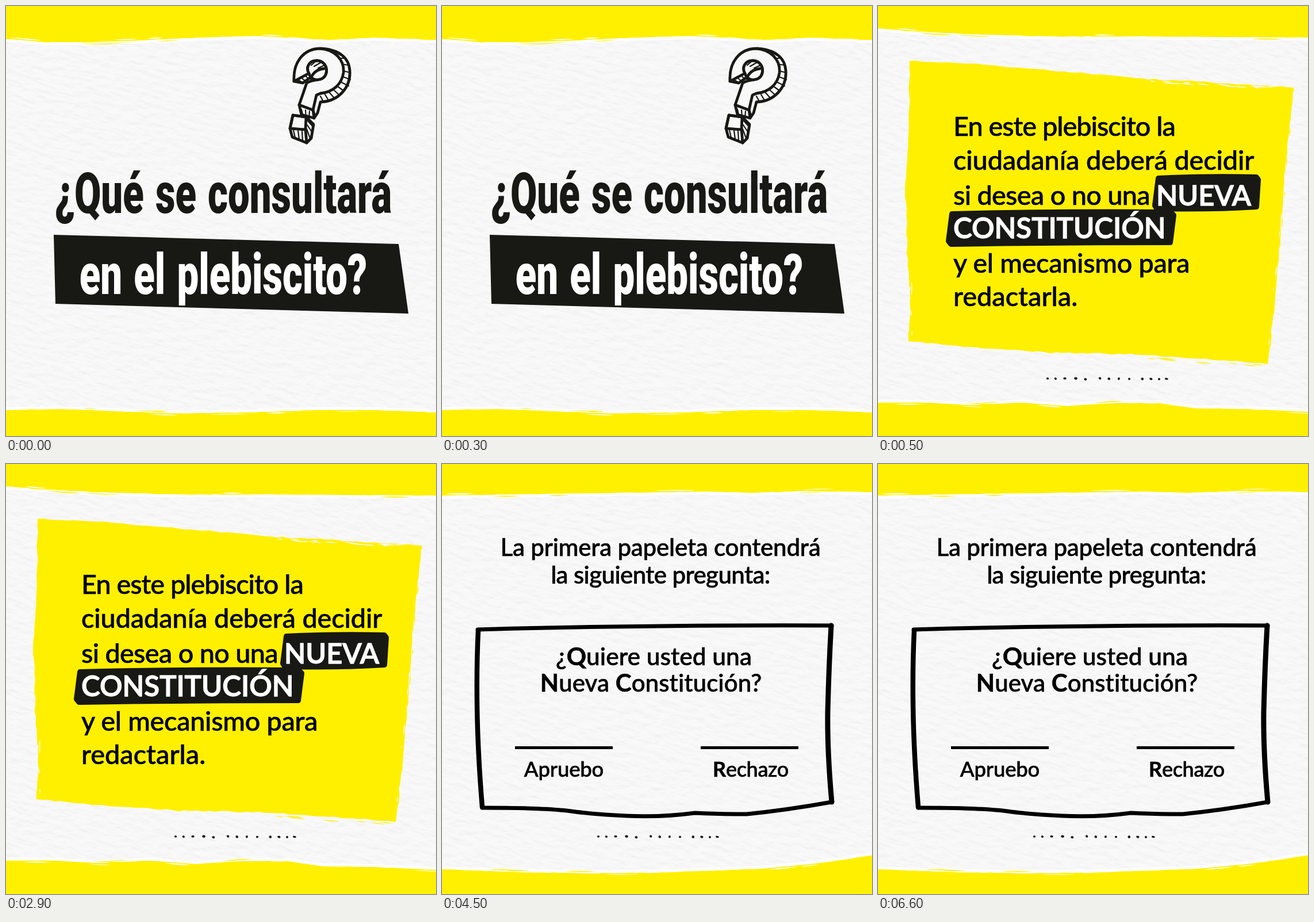
An HTML page for the animation above (8000 ms loop, 748 by 748 pixels).

```html
<!DOCTYPE html>
<html lang="es">
<head>
<meta charset="utf-8">
<title>Plebiscito</title>
<style>
  html, body { margin: 0; width: 100%; height: 100%; overflow: hidden; background: #f7f7f7; }
  svg { display: block; width: 100vw; height: 100vh; }
  text { font-family: Lato, sans-serif; font-weight: 500; }
  .ink { fill: #000; stroke: #000; stroke-width: .6; }
  .white { fill: #fff; stroke: #fff; stroke-width: 1.3; font-weight: 600; }
  .cap { font-weight: 700; }
  .title { font-family: Roboto, sans-serif; font-weight: 800; font-size: 98px; word-spacing: 5px; }
  .mark { fill: #181815; stroke: #181815; stroke-width: 10; stroke-linejoin: round; }
  .line { fill: none; stroke: #181815; stroke-linejoin: round; stroke-linecap: round; }
  .frame { fill: none; stroke: #000; stroke-linejoin: round; stroke-linecap: round; }
</style>
</head>
<body>
<svg id="stage" viewBox="0 0 748 748" xmlns="http://www.w3.org/2000/svg"></svg>
<script>
const YELLOW = '#fff000', INK = '#181815', PAPER = '#f8f8f8';
const LOOP = 8000, CUTS = [0, 500, 4500];

function random(seed) {
  return () => {
    seed = (seed * 1664525 + 1013904223) % 4294967296;
    return seed / 4294967296;
  };
}

const parse = s => s.split(' ').map(p => p.split(',').map(Number));
const fix = n => n.toFixed(1);

// Closed polygon whose sides are broken up like dry brush edges
function rough(points, amp, seed) {
  const rnd = random(seed), out = [];
  points.forEach(([x, y], i) => {
    const [u, v] = points[(i + 1) % points.length];
    const len = Math.hypot(u - x, v - y) || 1;
    const n = Math.max(1, Math.round(len / 11));
    for (let k = 0; k < n; k++) {
      const j = (rnd() + rnd() - 1) * amp, f = k / n;
      out.push(fix(x + (u - x) * f - (v - y) / len * j) + ',' +
               fix(y + (v - y) * f + (u - x) / len * j));
    }
  });
  return `M${out.join(' ')}Z`;
}

// Thin lens-shaped brush streak
function streak(x, y, w, h, fill, angle = 0) {
  return `<path transform="translate(${fix(x)} ${fix(y)}) rotate(${fix(angle)})" fill="${fill}"
    d="M0 0Q${fix(w * .4)} ${fix(-h)} ${fix(w)} 0Q${fix(w * .6)} ${fix(h)} 0 0Z"/>`;
}

// Yellow band with a white underpainted edge; side is -1 for top, 1 for bottom
function band(edge, side, seed) {
  const pts = parse(edge), far = side < 0 ? -20 : 768;
  const d = rough([[-10, pts[0][1]], ...pts, [758, pts[pts.length - 1][1]], [758, far], [-10, far]], .6, seed);
  const rnd = random(seed + 7);
  let s = `<path d="${d}" fill="#fff" transform="translate(0 ${-side * 5})"/><path d="${d}" fill="${YELLOW}"/>`;
  for (let i = 0; i < 7; i++) {
    const at = Math.floor(rnd() * (pts.length - 1)), f = rnd();
    const [a, b] = [pts[at], pts[at + 1]];
    const x = a[0] + (b[0] - a[0]) * f, y = a[1] + (b[1] - a[1]) * f;
    const slope = Math.atan2(b[1] - a[1], b[0] - a[0]) * 180 / Math.PI;
    const inside = i % 3 > 0;
    s += streak(x, y + side * (inside ? 2.5 : -3), 25 + rnd() * 50, 1 + rnd() * 1.2, inside ? '#fff' : YELLOW, slope);
  }
  return s;
}

function text(str, x, y, size, opt = {}) {
  const { cls = 'ink', anchor = 'start', gap = 0 } = opt;
  return `<text class="${cls}" x="${x}" y="${y}" font-size="${size}" text-anchor="${anchor}" letter-spacing="${gap}">${str}</text>`;
}

const mid = (str, y, size, gap, x = 380) => text(str, x, y, size, { anchor: 'middle', gap });
const cap = c => `<tspan class="cap">${c}</tspan>`;
const title = (str, x, y, fill) =>
  `<text class="title" transform="translate(${x} ${y}) scale(.685 1)" text-anchor="middle" fill="${fill}">${str}</text>`;

function dots(x0) {
  const rnd = random(21);
  return [0, 14, 30, 49, 66, 91, 107, 124, 142, 165, 180, 194, 207].map(dx =>
    `<ellipse cx="${x0 + dx}" cy="${fix(647.5 + rnd() * 2)}" rx="${fix(1.9 + rnd())}" ry="${fix(1.6 + rnd() * .8)}"
      transform="rotate(${fix(rnd() * 30)} ${x0 + dx} 648)" fill="${INK}"/>`).join('');
}

function question() {
  const hatch = `M514 180l3 13M521 181l1 14M528 183l-1 12M535 179l3 12
    M547 157l5 9M555 154l6 10M563 151l8 9M570 146l10 9M577 140l11 8M582 132l14 7M586 123l13 5M587 113l12 3M584 101l12 2M579 91l10 0
    M506 127l8 5M513 124l7 6M520 121l6 5M531 103l8 -7M536 105l12 -7M543 108l11 -5`;
  const dotHatch = 'M500 216l3 13M508 217l2 15M515 218l1 17M523 214l6 16M524 207l8 12M525 200l9 10';
  return `<g class="line" stroke-width="4.8">
    <path fill="${PAPER}" d="M501 131L516 134L530 124L545 119L510 172L514 189L536 195L542 186L547 167
      C578 166 600 142 598 113C597 91 581 76 548 74"/>
    <path fill="${PAPER}" d="M501 131C499 96 519 75 545 74C572 75 589 94 587 116C584 137 568 150 547 152
      L540 155L534 181L510 172L523 134C533 128 540 129 548 127C563 121 560 96 541 95C527 95 521 107 527 117Z"/>
    <path fill="${PAPER}" d="M527 117C521 107 527 95 541 95C560 96 563 121 548 127C540 130 530 128 527 117Z"/>
    <path d="M534 181L536 195M530 126C534 116 541 110 553 109"/>
    <path stroke-width="2.2" d="${hatch}"/>
    <path fill="${PAPER}" d="M499 190L522 193L535 206L531 230L523 238L498 228L494 213Z"/>
    <path d="M499 190L522 193L521 215L494 213ZM521 215L523 238"/>
    <path stroke-width="2.2" d="${dotHatch}"/>
  </g>`;
}

function opening() {
  return band('0,57 70,63 150,63 230,60 310,56 430,52 500,55 560,59 640,55 748,59', -1, 3) +
    band('0,703 100,701 190,705 290,709 420,707 540,703 640,703 748,707', 1, 5) +
    question() +
    title('¿Qué se consultará', 378, 360, INK) +
    `<path d="M83 398L683 414L700 535L86 518Z" fill="${INK}"/>` +
    title('en el plebiscito?', 378, 501, '#fff');
}

function panel() {
  const rnd = random(40);
  let s = `<path fill="${YELLOW}" d="${rough(parse('55,96 160,100 300,112 460,126 600,134 723,142 721,165 708,285 698,420 689,530 678,622 560,614 450,606 300,603 170,594 52,583 57,530 51,430 48,320 54,200'), 1.5, 12)}"/>`;
  for (let i = 0; i < 15; i++) {
    const f = rnd();
    s += streak(460 + f * 220, 129 + f * 11 + rnd() * 3, 8 + rnd() * 22, 1.8, PAPER, 5);
  }
  for (let i = 0; i < 26; i++) {
    const y = 175 + rnd() * 420;
    s += streak(721 - (y - 142) * .09 + rnd() * 5 - 2, y, 6 + rnd() * 15, 1.5, i % 3 ? YELLOW : PAPER, 95);
  }
  for (let i = 0; i < 8; i++) {
    const x = 460 + rnd() * 200;
    s += streak(x, 608 + (x - 450) * .075 + rnd() * 4, 12 + rnd() * 24, 1.6, YELLOW, 5);
  }
  for (let i = 0; i < 9; i++) s += streak(53 + rnd() * 6, 470 + rnd() * 95, 10, 1.4, PAPER, 88);
  return s;
}

function decision() {
  const row = (str, y, gap) => text(str, 131, y, 46.8, { gap });
  return band('0,39 60,44 160,49 300,53 450,53 600,54 748,55', -1, 9) +
    band('0,690 80,690 160,694 250,690 330,696 410,691 490,691 550,700 640,701 748,706', 1, 14) +
    panel() +
    `<path class="mark" d="M488 300Q570 296 658 298L661 302L658 349Q580 354 485 352L482 347Z"/>
     <path class="mark" d="M129 362Q320 357 509 359L514 364L508 411Q300 411 127 414L123 409Z"/>` +
    row('En este plebiscito la', 226, -1) +
    row('ciudadanía deberá decidir', 285, -.1) +
    row('si desea o no una', 346, -.7) +
    text('NUEVA', 484, 347, 48.6, { cls: 'white' }) +
    text('CONSTITUCIÓN', 131, 404, 49.2, { cls: 'white' }) +
    row('y el mecanismo para', 464, -.3) +
    row('redactarla.', 522, 0) +
    dots(295);
}

function ballot() {
  const rule = x => `<rect x="${x}" y="491" width="170" height="5"/>`;
  return band('0,55 120,53 260,51 450,48 540,50 630,47 748,49', -1, 17) +
    band('0,705 130,710 260,712 370,711 560,704 650,695 748,681', 1, 19) +
    mid('La primera papeleta contendrá', 160, 42, -.2) +
    mid('la siguiente pregunta:', 208, 42, -.6) +
    `<g class="frame">
      <path stroke-width="7" d="M62 288Q120 286 180 285Q420 280 678 281"/>
      <path stroke-width="9" d="M677 281Q673 350 671 430Q670 500 678 588"/>
      <path stroke-width="7" d="M678 588Q600 602 530 609Q480 609 440 607Q380 615 320 612Q260 609 225 604Q180 598 70 598"/>
      <path stroke-width="8.5" d="M70 597Q62 500 61 420Q60 350 63 289"/>
    </g>` +
    mid(`¿${cap('Q')}uiere usted una`, 350, 42.5, 0, 368.5) +
    mid(`${cap('N')}ueva ${cap('C')}onstitución?`, 396, 42, .1, 363.5) +
    rule(127) + rule(450) +
    mid('Apruebo', 544, 36.5, -.2, 212) +
    mid(`${cap('R')}echazo`, 544, 36, -.3, 537) +
    dots(272);
}

const stage = document.getElementById('stage');
stage.innerHTML = `<defs>
    <filter id="grain" filterUnits="userSpaceOnUse" x="-200" y="-200" width="1150" height="1150" color-interpolation-filters="sRGB">
      <feTurbulence type="fractalNoise" baseFrequency=".04 .1" numOctaves="3" seed="4"/>
      <feDiffuseLighting surfaceScale="1" diffuseConstant="1.12" lighting-color="#fff">
        <feDistantLight azimuth="235" elevation="60"/>
      </feDiffuseLighting>
    </filter>
  </defs>
  <rect width="748" height="748" fill="${PAPER}"/>
  <rect x="-200" y="-200" width="1150" height="1150" filter="url(#grain)" opacity=".2" transform="rotate(18 374 374)"/>
  ${[opening, decision, ballot].map(draw => `<g class="scene">${draw()}</g>`).join('')}`;

const scenes = [...stage.querySelectorAll('.scene')];
const start = performance.now();

function render(time) {
  const t = time % LOOP;
  const now = CUTS.filter(c => t >= c).length - 1;
  scenes.forEach((g, i) => g.setAttribute('display', i === now ? 'inline' : 'none'));
}

function tick() {
  render(performance.now() - start);
  requestAnimationFrame(tick);
}
tick();
</script>
</body>
</html>
```
